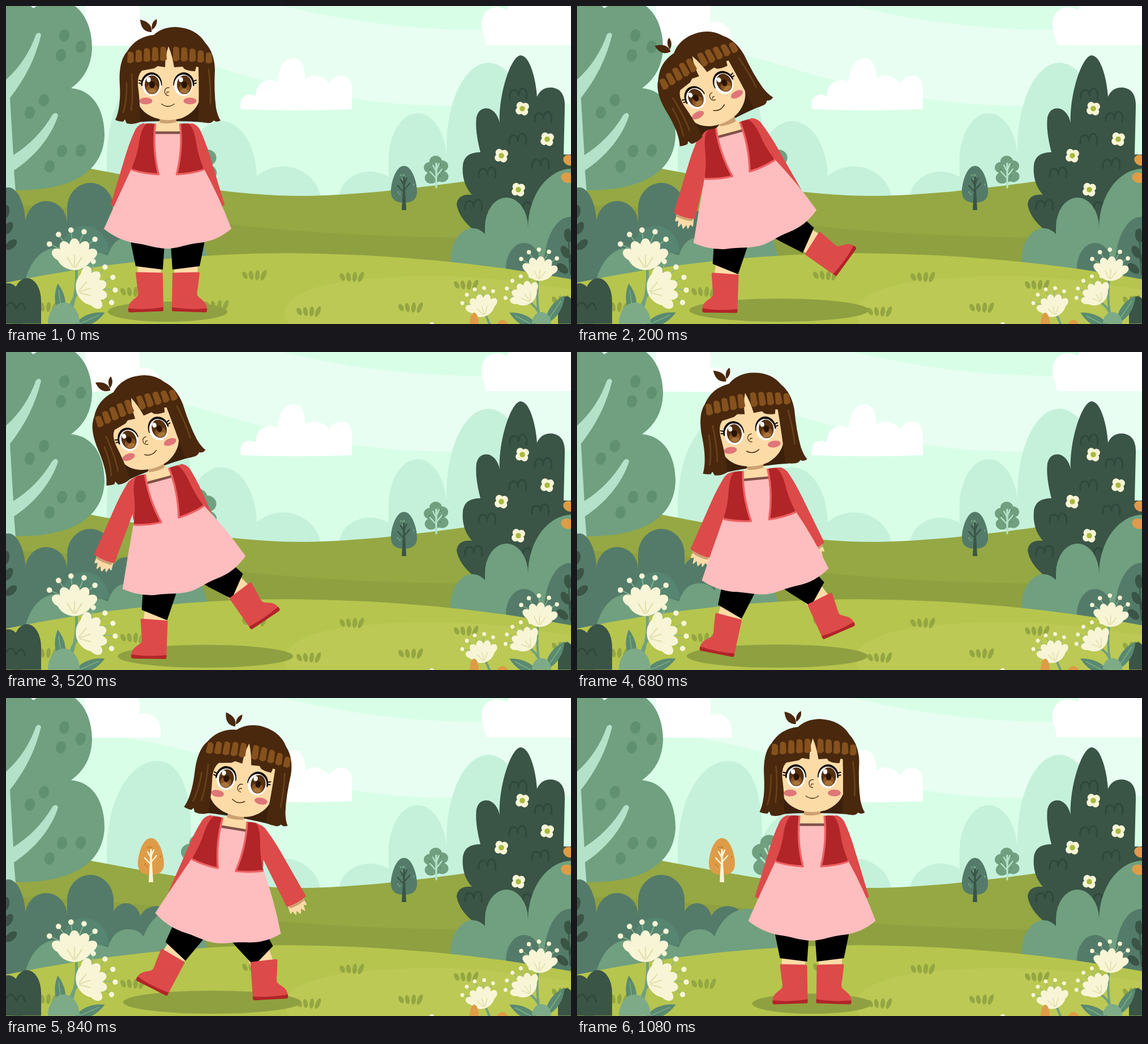
Recreate the animation shown at these times as an HTML page with a canvas. Size 998 by 561 pixels, loop 1.52 s.

```html
<!DOCTYPE html>
<html lang="en">
<head>
<meta charset="utf-8">
<title>Walk in the meadow</title>
<style>
html, body { margin: 0; width: 100%; height: 100%; overflow: hidden; background: #d9fee8; }
canvas { display: block; width: 998px; height: 561px; }
</style>
</head>
<body>
<canvas id="stage" width="998" height="561"></canvas>
<script>
const W = 998, H = 561, LOOP = 1520, STEP = 40;
const stage = document.getElementById('stage').getContext('2d');
let c = stage;

const leaf = '#70a07f', teal = '#547b69', dark = '#3a5446', mint = '#b3e2c9';
const far = '#c5f1db', cream = '#f8f5d6', orange = '#de9c48', blade = '#94a642';
const hair = '#49280d', skin = '#fddba7', tan = '#cda071', ink = '#120a05';
const red = '#dd4a4a', wine = '#b12428', trim = '#ee6163', pink = '#febdbe';

// ---------- helpers ----------
const rad = deg => deg * Math.PI / 180;

function fill(col, d) { c.fillStyle = col; c.fill(new Path2D(d)); }

function line(col, width, d) {
  c.strokeStyle = col;
  c.lineWidth = width;
  c.lineCap = c.lineJoin = 'round';
  c.stroke(new Path2D(d));
}

function oval(col, x, y, rx, ry = rx, deg = 0, from = 0, to = 360) {
  c.fillStyle = col;
  c.beginPath();
  c.ellipse(x, y, rx, ry, rad(deg), rad(from), rad(to));
  c.fill();
}

function dome(col, x, w, top, ry = w / 2, bottom = 490) {
  oval(col, x, top + ry, w / 2, ry, 0, 180, 360);
  c.fillRect(x - w / 2, top + ry - 0.5, w, bottom - top - ry);
}

function at(x, y, deg, draw, sx = 1, sy = sx) {
  c.save();
  c.translate(x, y);
  c.rotate(rad(deg));
  c.scale(sx, sy);
  draw();
  c.restore();
}

// Point (dx, dy) of a part that stands at (x, y) turned by deg.
function joint([x, y], deg, dx, dy) {
  const s = Math.sin(rad(deg)), k = Math.cos(rad(deg));
  return [x + dx * k - dy * s, y + dx * s + dy * k];
}

function fan(n, step, turn, draw) {
  for (let i = 0; i < n; i++) draw(turn + (i - (n - 1) / 2) * step);
}

function speckle(col, n, rx, ry, seed) {
  const rnd = () => (seed = seed * 16807 % 2147483647) / 2147483647;
  while (n--) {
    const a = rnd() * 360, r = 0.4 + rnd() * 0.5;
    oval(col, rx * r * Math.cos(rad(a)), ry * r * Math.sin(rad(a)), 1.4, 2);
  }
}

// ---------- scenery ----------
function sky() {
  c.fillStyle = '#d9fee8';
  c.fillRect(0, 0, W, H);
  fill('#e8fef2', 'M0,0 H488 C580,22 700,42 830,42 Q930,43 998,40 V172 Q840,180 700,173 C580,163 470,137 400,116 Q300,84 200,68 L0,60Z');
  fill('#fff', 'M140,70 V0 H234 Q238,16 235,29 Q252,24 265,36 Q275,46 273,70Z');
  fill('#fff', 'M415,182 Q411,160 427,157 Q436,155 441,160 Q442,136 459,132 Q471,128 480,134 Q482,93 509,92 Q527,92 529,128 Q541,119 556,125 Q567,130 570,137 Q579,122 594,123 Q611,125 611,148 V182 Q515,186 415,182Z');
  fill('#fff', 'M848,69 Q846,58 843,49 Q834,22 850,8 Q866,-3 885,7 L890,-4 H998 V69Z');
  fill(far, 'M178,360 V262 C182,160 228,111 267,111 C306,111 327,160 327,240 V360Z');
  dome(far, 380, 126, 203, 100);
  dome(far, 489, 134, 283, 62);
  dome(far, 643, 110, 292, 48);
  dome(far, 727, 103, 189, 84);
  dome(far, 852, 148, 100, 150);
}

function twigs(col) {
  line(col, 3.4, 'M0,-12 V30');
  line(col, 2.4, 'M0,14 L-11,2 M0,10 L10,-2 M0,2 L-6,-9 M0,0 L5,-12');
}

function eggTree(x, y, crown, trunk, spot) {
  at(x, y, 0, () => {
    fill(crown, 'M0,-33 C16,-33 24,2 23,14 Q22,32 0,32 Q-22,32 -23,14 C-24,2 -16,-33 0,-33Z');
    speckle(spot, 9, 20, 25, 7);
    twigs(trunk);
    fill(trunk, 'M-2,10 H2 L4,45 H-4Z');
  });
}

function lobeTree(x, y, s) {
  at(x, y, 0, () => {
    oval(leaf, -1, 3, 15, 18);
    fan(5, 62, -5, a => oval(leaf, 12 * Math.sin(rad(a)), 2 - 18 * Math.cos(rad(a)), 11, 10));
    speckle('#5b8d6e', 7, 18, 22, 11);
    twigs(mint);
  }, s);
}

function hills() {
  fill('#95a843', 'M0,272 Q100,276 160,289 C300,316 420,336 530,335 C680,332 800,309 998,285 V561 H0Z');
  fill('#8fa041', 'M0,350 Q250,360 390,384 Q600,412 998,409 V561 H0Z');
  eggTree(256, 280, orange, cream, '#c98534');
  lobeTree(341, 279, 1.45);
  eggTree(703, 315, teal, dark, leaf);
  lobeTree(760, 290, 1);
}

function bigTree() {
  fill(leaf, 'M0,0 H44 L48,4 Q60,-4 75,-8 H110 C140,8 152,40 152,75 Q150,120 115,145 C155,148 174,185 174,228 C172,290 120,326 18,325 H0Z');
  fill(mint, 'M0,130 Q36,98 53,50 Q59,44 62,51 C52,92 34,128 7,162 L13,263 Q56,236 82,192 Q89,185 92,193 C80,232 48,268 14,290 L17,327 H0Z');
  for (const [x, y] of [[103, 52], [97, 87], [132, 72], [67, 166], [42, 188], [99, 256], [132, 255], [77, 283]]) oval('#5f9070', x, y, 9, 11, 12);
}

function blossom(x, y) {
  at(x, y, 0, () => {
    fan(4, 90, 10, a => oval(cream, ...joint([0, 0], a, 0, -7), 6.5, 6, a));
    oval('#a9b93f', 0, 0, 4.8);
  });
}

function pine() {
  fill(dark, 'M826,395 Q800,374 796,350 Q798,331 823,333 Q804,312 807,280 Q810,258 838,258 Q828,220 831,196 Q836,178 853,181 Q867,186 872,206 C870,155 892,88 909,87 C926,88 936,130 938,160 Q946,142 966,144 Q988,148 987,178 L985,262 H998 V440 H826Z');
  for (const [x, y] of [[905, 154], [949, 195], [904, 234], [850, 293], [944, 277], [826, 350], [928, 352]]) {
    at(x, y, 0, () => line('#2f483c', 3, 'M-15,9 Q-16,-7 -6,-6 Q0,-5 0,4 Q2,-11 10,-8 Q17,-3 14,10'));
  }
  blossom(912, 181);
  blossom(956, 235);
  blossom(875, 264);
  blossom(905, 324);
}

function bushes() {
  dome(teal, 4, 62, 320, 70);
  dome(teal, 71, 74, 344, 40);
  dome(teal, 149, 82, 312, 44);
  dome(teal, 212, 52, 362, 30);
  dome(teal, 266, 66, 367, 34);
  fill(leaf, 'M30,500 Q42,438 80,428 Q130,420 180,440 Q190,408 216,408 Q234,408 243,421 C258,380 285,371 305,372 Q342,376 357,450 V500Z');
  dome('#568671', 139, 84, 388, 46, 436);
  fill(leaf, 'M80,442 Q95,420 140,428 Q180,436 190,470 H60Z');

  oval(orange, 995, 272, 11, 9, 25);
  dome(leaf, 1000, 156, 287, 105);
  oval(orange, 992, 303, 12, 9, 15);
  dome(leaf, 884, 76, 338, 52);
  dome(leaf, 824, 78, 392, 58);
  dome(teal, 915, 64, 418, 44);
  dome(teal, 996, 92, 372, 90);
}

function grass(x, y) {
  at(x, y, 0, () => {
    for (let i = 0; i < 4; i++) oval(blade, i * 11 - 17, 1, 4, 7 + i, i * 17 - 28);
  });
}

function meadow() {
  fill('#b6c54d', 'M0,488 Q250,436 500,436 Q760,438 998,482 V561 H0Z');
  fill('#bcc955', 'M500,561 C470,520 530,490 640,481 Q780,470 900,486 L998,500 V561Z');
  for (const [x, y] of [[439, 474], [611, 477], [813, 491], [715, 531], [535, 538], [372, 527], [224, 503], [70, 530], [986, 518]]) grass(x, y);
}

function sprig(x, y, flip) {
  at(x, y, 0, () => {
    line(dark, 2, 'M-4,70 Q0,30 -2,-10');
    for (let i = 0; i < 3; i++) oval(dark, i * 5, 2 + i * 29, 7, 12, 10 + i * 20);
    oval(dark, -9, 40, 6, 12, -30);
  }, flip, 1);
}

function flower(x, y, s, deg) {
  at(x, y, deg, () => {
    const dots = draw => fan(5, 27, -6, a => draw(joint([0, 15], a, 0, -50)));
    dots(p => line('#8db78f', 1.6, `M0,10 L${p}`));
    dots(p => oval(cream, ...p, 4.8));
    fan(5, 29, 0, a => oval(cream, ...joint([1, 26], a, 0, -32), 9.5, 14, a));
    fill(cream, 'M-31,14 Q-22,35 1,36 Q24,34 33,14 L16,-4 H-14Z');
    fan(3, 32, 0, a => line('#e4e0b0', 2.4, `M${joint([1, 34], a, 0, -4)} L${joint([1, 34], a, 0, -24)}`));
  }, s);
}

function longLeaf(x, y, deg) {
  at(x, y, deg, () => {
    fill('#5a8a70', 'M0,0 Q-18,-30 0,-62 Q18,-30 0,0Z');
    line('#7fae8c', 1.5, 'M0,0 V-50');
  });
}

function foreground() {
  sprig(-1, 361, 1);
  sprig(993, 403, -1);
  dome(dark, 37, 50, 480, 40, H);
  dome(dark, 4, 50, 489, 40, H);
  line('#2f483c', 3, 'M0,530 Q10,514 18,534 Q28,514 34,536');
  line(leaf, 5, 'M124,462 Q127,500 114,540 M136,498 Q116,512 112,540');
  longLeaf(100, 551, -8);
  longLeaf(118, 566, 66);
  dome('#7dab88', 102, 56, 523, 36, H);
  flower(120, 430, 1, 0);
  flower(158, 494, 0.98, 72);

  dome(dark, 990, 30, 512, 30, H);
  line(leaf, 4, 'M940,478 Q936,520 942,545 M922,521 Q938,530 942,545 M846,542 L854,561');
  longLeaf(952, 562, 34);
  longLeaf(944, 570, -62);
  dome('#7dab88', 946, 34, 540, 20, H);
  flower(943, 457, 0.78, 5);
  flower(912, 503, 0.72, -35);
  flower(838, 523, 0.72, -15);
  dome(orange, 827, 16, 541, 20, H);
  dome(orange, 877, 18, 554, 8, H);
  oval(cream, 752, 561, 4, 3);
}

function layer(draw) {
  const cv = document.createElement('canvas');
  cv.width = W;
  cv.height = H;
  c = cv.getContext('2d');
  draw();
  c = stage;
  return cv;
}

const back = layer(() => { sky(); hills(); bigTree(); pine(); bushes(); meadow(); });
const front = layer(foreground);

// ---------- motion ----------
// x, y: middle of the dress hem; every other value is a joint angle.
const stand = { x: 285.5, y: 393, lean: 0, head: 0, armL: 15, armR: 15, legL: 0, legR: 0, footL: 0, footR: 0 };
const kick = { x: 314.5, y: 389, lean: -15, head: -28, armL: 15, armR: 28, legL: 15, legR: -59, footL: 3, footR: -56 };
const settle = { ...kick, head: -20, armL: 22, armR: 22, footR: -36 };
const stride = { x: 374.5, y: 397.5, lean: 9.3, head: 10, armL: 22, armR: 28, legL: 36, legR: -39, footL: 29, footR: -5 };
const close = { ...stride, x: 395.5, y: 394, lean: 8.9, head: 8, armR: 23, legL: 25, legR: -21, footL: 20, footR: -1 };
const keys = [[0, stand], [200, kick], [520, settle], [560, settle], [840, stride], [960, close], [1080, { ...stand, x: 415 }]];

// Monotone cubic: passes smoothly through the keys without overshoot.
function channel(name, t) {
  const last = keys.length - 1;
  if (t >= keys[last][0]) return keys[last][1][name];
  const k = keys.findIndex((key, i) => t < keys[i + 1][0]);
  const rate = j => (keys[j + 1][1][name] - keys[j][1][name]) / (keys[j + 1][0] - keys[j][0]);
  const slope = j => {
    if (j === 0 || j === last) return 0;
    const a = rate(j - 1), b = rate(j);
    return a * b <= 0 ? 0 : 2 * a * b / (a + b);
  };
  const [[t0, a], [t1, b]] = keys.slice(k, k + 2);
  const h = t1 - t0, u = (t - t0) / h, e = u * u * (3 - 2 * u);
  return a[name] + (b[name] - a[name]) * e + h * u * (1 - u) * ((1 - u) * slope(k) - u * slope(k + 1));
}

function poseAt(t) {
  const p = {};
  for (const name in stand) p[name] = channel(name, t);
  p.hem = [p.x, p.y];
  p.neck = joint(p.hem, p.lean, -0.5, -185);
  p.eyes = joint(p.neck, p.head, 0, -69);
  p.left = legJoints(p, -1, p.legL, p.footL);
  p.right = legJoints(p, 1, p.legR, p.footR);
  return p;
}

function legJoints(p, side, swing, foot) {
  const hip = joint(p.hem, p.lean, side * 32.5, -6);
  const knee = joint(hip, swing, 0, 75);
  const boot = joint(knee, foot, 0, 8.5);
  return { side, swing, foot, knee, boot, toe: joint(boot, foot, side * 37, 68) };
}

// ---------- girl ----------
function shadow({ left, right }) {
  const rx = 50 + 0.4 * (right.toe[0] - left.toe[0]), ry = 12.5 + rx * 0.05;
  oval('#8fa041', (left.toe[0] + right.toe[0]) / 2, 557 - ry, rx, ry);
}

function drawLeg({ side, swing, foot, knee, boot }) {
  line(skin, 41, `M${joint(knee, swing, 0, -20)} L${joint(boot, foot, 0, 22)}`);
  at(...knee, swing, () => fill('#000', 'M-24,-3 L24,3 L27,-42 L28,-74 L-34,-74 L-32,-42Z'), -side, 1);
  at(...boot, foot, () => {
    fill(red, 'M-24,1 Q-24,-1 -21,-1 L22,0 Q24,0 24,2 L25,64 L-37,65 C-37,50 -26,48 -20,40 Q-19,34 -21,26Z');
    fill(wine, 'M-37,63 Q-6,66 25,61 L25,66 Q25,68 22,68 L-34,70 Q-38,70 -37,63Z');
  }, -side, 1);
}

function drawArm(p, side, swing) {
  at(...joint(p.hem, p.lean, side * 45.5, -171), -side * swing, () => {
    const hand = 'M-15,136 H11 Q14,146 13,152 L8,149 L6,160 L2,152 L-3,161 L-7,152 L-11,159 L-13,150 L-18,153 Q-17,146 -15,136Z';
    fill(skin, hand);
    line(skin, 2, hand);
    fill(tan, 'M-16,136 H15 V144 Q0,148 -15,145Z');
    fill(red, 'M-15,-4 Q-7,-17 2,-15 Q12,-9 13,4 Q16,22 17,45 L20,139 Q0,144 -19,140Z');
  }, side, 1);
}

// Torso shapes are drawn around the middle line x = 0.
function jacketSide() {
  fill(red, 'M-63,282 C-57,250 -61,210 -37,207 L-23,208 L-27,240Z');
  fill(wine, 'M-40,210 Q-35,206 -22,208 Q-27,252 -16,297 Q-41,296 -64,288 Q-53,262 -50,238 Q-47,220 -40,210Z');
  line(trim, 3.4, 'M-22,209 Q-27,252 -16,297 Q-41,296 -63,289');
}

function torso() {
  fill(skin, 'M-25,210 L-14,203 V186 H15 V203 L25,210 V226 H-25Z');
  fill(tan, 'M-14,190 H15 V205 Q0,209 -14,206Z');
  fill(pink, 'M-25,224 H25 L64,287 Q92,338 112.5,393 C95,408 75,416 55,418 C30,421 16,428 0,428 C-20,428 -35,421 -60,418 C-79,414 -97,406 -112.5,393 Q-89,340 -64,287Z');
  line('#805048', 4.5, 'M-20,223.5 H21');
  jacketSide();
  at(0, 0, 0, jacketSide, -1, 1);
}

function eye(x, side) {
  at(x, 139, 0, () => {
    line(ink, 2, 'M-16,-6 L-22,-8 M-17,-2 L-22,-3');
    oval(ink, 0, -1, 18.5, 21, 0, 172, 366);
    oval('#fff', 0.5, 1, 16.5, 19);
  }, side, 1);
  oval('#54300f', x + 1, 139, 13, 16.5);
  oval('#8a5524', x + 1, 146, 10, 9);
  oval('#a87439', x + 1, 150, 7, 4);
  oval('#2a1406', x + 1, 139, 5, 6);
  oval('#fff', x - 5, 130, 3.6, 4.4);
  oval('#df7678', x + (side > 0 ? -10 : 11), 167.5, 11.5, 6);
}

function face() {
  fill(skin, 'M232,70 V165 Q236,187 262,197 Q286,205 310,198 Q336,187 342,165 V70Z');
  eye(257, 1);
  eye(314, -1);
  line('#4d2c10', 1.3, 'M288,144 C278,143 278,158 287,158 M288,152 Q284,150 284,154');
  line('#4d2c10', 1.5, 'M275,173 Q286,181 297,173');
}

function fringe() {
  fill(hair, 'M193,201 Q203,180 201,140 Q198,98 214,80 Q230,54 261,51 Q276,37 300,37 Q336,39 352,65 Q368,82 369,112 Q367,150 371,180 Q374,195 379,202 Q372,206 367,202 Q362,208 354,206 Q345,206 340,202 Q341,150 340,108 L336,107 L334,115 Q322,115 315,111 L312,107 L297,108 Q294,88 287,71 Q281,88 281,108 L268,106 L262,110 L240,114 Q232,122 233,140 Q238,180 236,205 Q224,210 213,207 L210,200 L207,204 Q199,204 193,201Z');
  line(hair, 2, 'M249,104 Q256,97 264,101 M309,101 Q317,97 324,104');
  for (let i = 0; i < 10; i++) {
    const x = 214 + i * 14.5 + (i > 4 ? 8 : 0), y = 73 + ((x - 281) / 22) ** 2, h = 23 - (y - 73) * 0.6;
    fill('#85511d', `M${x + 1},${y} q5,-4 10,1 l1,${h - 3} q-6,6 -12,1Z`);
  }
  line('#6b411a', 2.6, 'M213,136 Q214,166 207,188 M222,120 Q225,160 221,184 M358,112 Q362,145 361,172');
  fill(hair, 'M257,46 C243,46 238,36 237,24 C252,27 259,36 257,46Z M258,42 C256,33 260,26 266,23 C268,31 264,38 258,42Z');
}

function girl(p) {
  const onHead = draw => at(...p.eyes, p.head, () => { c.translate(-285, -139); draw(); });
  drawLeg(p.left);
  drawLeg(p.right);
  drawArm(p, -1, p.armL);
  drawArm(p, 1, p.armR);
  onHead(() => fill('#3b200b', 'M234,110 V205 Q250,203 286,203 Q325,203 345,205 V110Z'));
  at(...p.hem, p.lean, () => { c.translate(0, -393); torso(); });
  onHead(() => { face(); fringe(); });
}

const start = performance.now();
function tick() {
  const t = (performance.now() - start) % LOOP;
  const pose = poseAt(Math.floor(t / STEP) * STEP);
  c.drawImage(back, 0, 0);
  shadow(pose);
  c.drawImage(front, 0, 0);
  girl(pose);
  requestAnimationFrame(tick);
}
tick();
</script>
</body>
</html>
```
